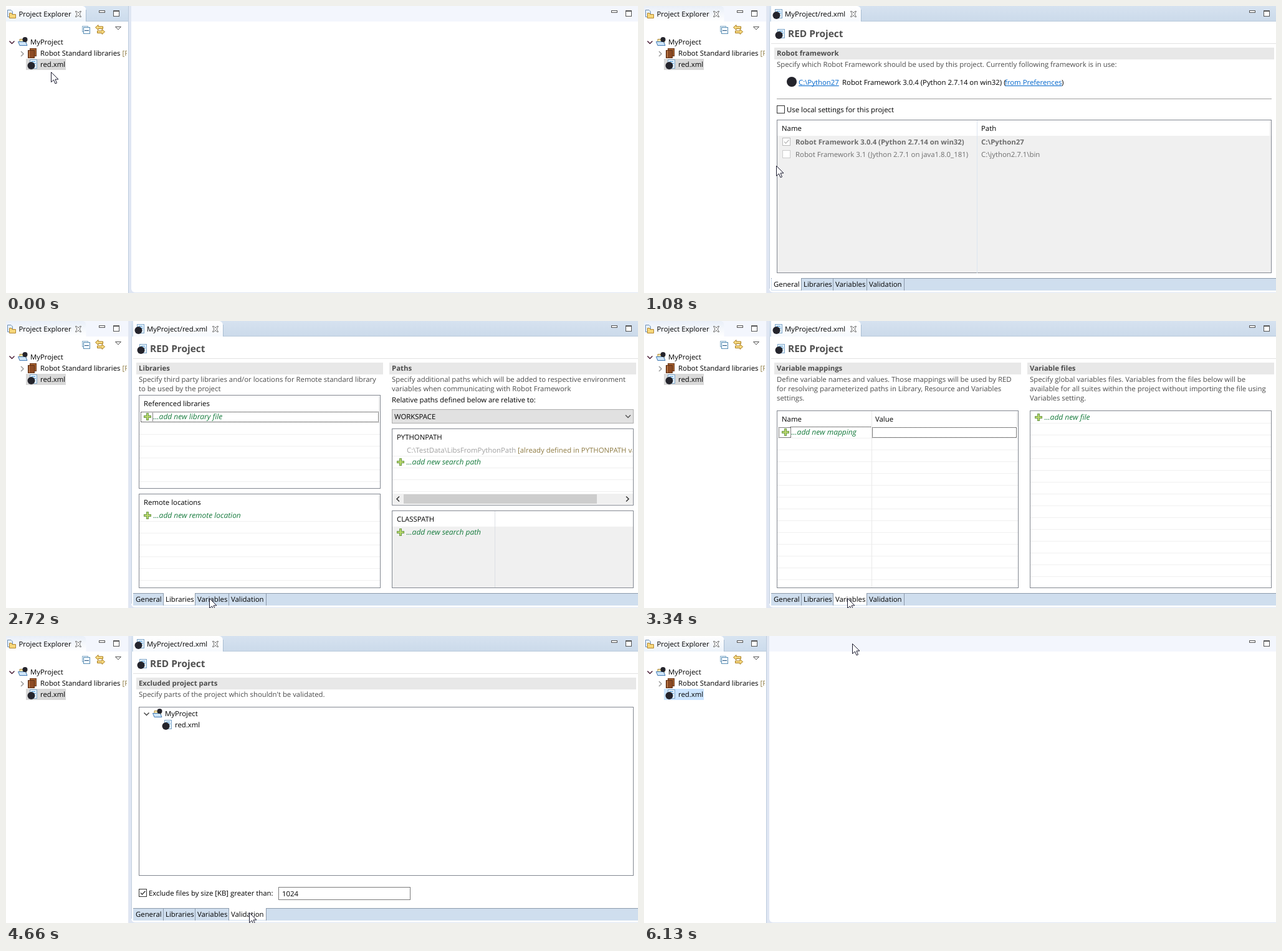
Write an HTML page with a canvas that moves like this. It is 1014x462 px and loops after 6310 ms.

```html
<!DOCTYPE html>
<html lang="en">
<head>
<meta charset="utf-8">
<title>Project editor tour</title>
<style>
html, body { margin: 0; width: 100%; height: 100%; overflow: hidden; background: #fff; }
canvas { display: block; }
</style>
</head>
<body>
<canvas id="stage" width="1014" height="462"></canvas>
<script>
const ctx = document.getElementById('stage').getContext('2d');
const LOOP = 6310, OPEN = 780, PAINTED = 870, CLOSED = 5970;
const SIZE = 11.36;
const BLUE = '#cfdeee', PALE = '#f3f6fd', FRAME = '#828790', GREY = '#f0f0f0';
const MUTED = '#4c4c4c', OLIVE = '#8d7a42', GREEN = '#157a3c', LINK = '#0066cc';

// Cursor moves: start, end, number of steps, destination
const START = [72, 106];
const MOVES = [
  [80, 80, 1, 70, 94],
  [870, 1410, 8, 303, 362],
  [1490, 1870, 6, 268, 449],
  [2410, 2720, 5, 326, 446],
  [3730, 3960, 4, 385, 446],
  [4120, 4200, 2, 390, 445],
  [5210, 5360, 3, 357, 76],
  [5440, 5810, 6, 337, 9],
  [6050, 6130, 2, 334, 12],
];

// Drawing helpers
function rect(x, y, w, h, color) {
  ctx.fillStyle = color;
  ctx.fillRect(x, y, w, h);
}

function box(x, y, right, bottom, stroke, fill) {
  if (fill) rect(x, y, right - x, bottom - y, fill);
  ctx.strokeStyle = stroke;
  ctx.lineWidth = 1;
  ctx.strokeRect(x + .5, y + .5, right - x - 1, bottom - y - 1);
}

function path(points, stroke, fill, width = 1, close = false) {
  ctx.beginPath();
  for (let i = 0; i < points.length; i += 2) ctx.lineTo(points[i], points[i + 1]);
  if (close) ctx.closePath();
  if (fill) { ctx.fillStyle = fill; ctx.fill(); }
  if (stroke) { ctx.strokeStyle = stroke; ctx.lineWidth = width; ctx.stroke(); }
}

function disc(x, y, r, color) {
  ctx.beginPath();
  ctx.arc(x, y, r, 0, 2 * Math.PI);
  ctx.fillStyle = color;
  ctx.fill();
}

function text(str, x, y, color = '#000', style = '', size = SIZE) {
  ctx.font = `${style} ${size}px "Open Sans", "Noto Sans", sans-serif`;
  ctx.fillStyle = color;
  ctx.fillText(str, x, y);
  return x + ctx.measureText(str).width;
}

function link(str, x, y) {
  const end = text(str, x, y, LINK);
  rect(x, y + 1, end - x, 1, LINK);
}

function clipped(right, draw) {
  ctx.save();
  ctx.beginPath();
  ctx.rect(0, 0, right, 462);
  ctx.clip();
  draw();
  ctx.restore();
}

// Focus outline: every second pixel of the border
function dotted(left, top, right, bottom) {
  const dot = (x, y) => { if ((x + y) % 2) rect(x, y, 1, 1, '#000'); };
  for (let x = left; x < right; x++) { dot(x, top); dot(x, bottom - 1); }
  for (let y = top; y < bottom; y++) { dot(left, y); dot(right - 1, y); }
}

function gradient(y0, y1, from, to) {
  const g = ctx.createLinearGradient(0, y0, 0, y1);
  g.addColorStop(0, from);
  g.addColorStop(1, to);
  return g;
}

// Icons and controls
function fileIcon(x, y) {
  box(x + 4, y, x + 16, y + 15, '#7fa6c9', '#e4f1fb');
  rect(x + 7, y + 3, 6, 1, '#4f9bd9');
  rect(x + 9, y + 6, 5, 1, '#4f9bd9');
  disc(x + 6.5, y + 10, 6, '#24242c');
}

function folderIcon(x, y) {
  path([x + 2.5, y + 13.5, x + 2.5, y + 3.5, x + 7, y + 3.5, x + 8, y + 5.5, x + 13, y + 5.5, x + 13, y + 13.5],
    '#b08a3c', '#fbe9ae', 1, true);
  path([x + 2.5, y + 13.5, x, y + 7.5, x + 12, y + 7.5, x + 14.5, y + 13.5], '#3f79b5', '#cfe5f8', 1, true);
  disc(x + 11, y + 4, 4, '#24242c');
}

function plusIcon(x, y) {
  const plus = (r, w, color) => {
    rect(x - r, y - w, 2 * r, 2 * w, color);
    rect(x - w, y - r, 2 * w, 2 * r, color);
  };
  plus(6, 2, '#6d9a4c');
  plus(5, 1, '#b9d86c');
}

function closeIcon(x, y) {
  path([x - 4.5, y - 4.5, x - 2.5, y - 4.5, x, y - 2, x + 2.5, y - 4.5, x + 4.5, y - 4.5, x + 2, y,
    x + 4.5, y + 4.5, x + 2.5, y + 4.5, x, y + 2, x - 2.5, y + 4.5, x - 4.5, y + 4.5, x - 2, y],
    '#666', '#fff', 1, true);
}

function chevron(x, y, color, dx = 4, dy = 2) {
  const points = dx > dy ? [x - dx, y - dy, x, y + dy, x + dx, y - dy] : [x - dx, y - dy, x + dx, y, x - dx, y + dy];
  path(points, color, null, 1.5);
}

function windowButtons(x) {
  box(x, 7, x + 10, 11, '#555', '#fff');
  box(x + 23, 7, x + 33, 17, '#555', '#fff');
  rect(x + 23, 8, 10, 1, '#555');
}

function checkbox(x, y, checked, color = '#333', fill = '#fff') {
  box(x, y, x + 13, y + 13, color, fill);
  if (checked) path([x + 3, y + 6.5, x + 5.5, y + 9, x + 10.5, y + 3.5], color, null, 1.3);
}

function rows(x, right, first, bottom) {
  for (let y = first; y < bottom - 1; y += 19) rect(x + 1, y, right - x - 2, 1, '#f0f0f0');
}

function addItem(label, x, y) {
  plusIcon(x, y - 4);
  text('...add new ' + label, x + 9.5, y, GREEN, 'italic', 12);
}

function section(title, lines, x, right) {
  rect(x - 4, 67, right - x + 4, 19, '#e8e8e8');
  text(title, x, 80, MUTED, 'bold');
  lines.forEach((line, i) => text(line, x, 98 + 15 * i, MUTED));
}

// Side view
function sidebar(focused, selection) {
  rect(0, 0, 197, 462, '#fff');
  rect(0, 0, 196, 25, focused ? gradient(0, 25, '#d8e4f1', '#cbdbec') : PALE);
  ctx.beginPath();
  ctx.moveTo(0, 0);
  ctx.lineTo(123, 0);
  ctx.quadraticCurveTo(128.5, 1, 128.5, 7);
  ctx.lineTo(128.5, 25);
  ctx.lineTo(0, 25);
  ctx.fillStyle = focused ? gradient(0, 25, '#ffffff', '#edf3fa') : gradient(0, 25, '#e9eff8', '#ffffff');
  ctx.fill();
  if (focused) {
    rect(128, 6, 1, 19, '#a9bdd2');
    rect(129, 24, 67, 1, '#b9cadc');
  }
  rect(196, 0, 1, 462, focused ? '#bccbdc' : '#e3e8f2');

  path([2.5, 6.5, 8, 6.5, 10.5, 9, 10.5, 17.5, 2.5, 17.5], '#6f8fb4', '#e6f0fa', 1, true);
  path([5.5, 19.5, 5.5, 11.5, 9, 11.5, 10, 13.5, 15.5, 13.5, 15.5, 19.5], '#b4862f', '#f6d77c', 1, true);
  text('Project Explorer', 20.5, 17);
  closeIcon(116, 13);
  windowButtons(149);

  box(122, 32, 132, 42, '#8fb2cc', '#e8f3fb');
  box(124, 34, 135, 45, '#5b8fb5', '#f4faff');
  rect(126, 39, 7, 1, '#22507c');
  path([143.5, 34.5, 148, 30.5, 148, 33, 155.5, 33, 155.5, 36.5, 148, 36.5, 148, 38.5],
    '#a87b1c', '#f9dc83', 1, true);
  path([158.5, 41.5, 154, 37.5, 154, 40, 146.5, 40, 146.5, 43.5, 154, 43.5, 154, 45.5],
    '#a87b1c', '#f9dc83', 1, true);
  path([175.5, 33.5, 184.5, 33.5, 180, 38], '#555', '#fff', 1, true);

  chevron(9.5, 58.5, '#4b1e36');
  folderIcon(19.5, 50);
  text('MyProject', 39, 62);
  chevron(26, 77, '#9a9a9a', 2, 4);
  box(38, 68, 49, 81, '#6b371a', '#a3602f');
  box(35, 71, 46, 84, '#5b2d14', '#8d4b24');
  rect(37, 72, 1, 11, '#c58a58');
  clipped(194, () => {
    const end = text('Robot Standard libraries', 55, 80);
    text(' [RobotFramework]', end, 80, OLIVE);
  });
  rect(32, 85, 64, 18, selection);
  fileIcon(34, 86);
  text('red.xml', 55, 98);
}

// Editor area
function emptyEditor() {
  rect(197, 0, 817, 462, '#dfe6f3');
  ctx.beginPath();
  ctx.roundRect(201, -10, 830, 471, 6);
  ctx.fillStyle = '#fff';
  ctx.fill();
  rect(201, 0, 813, 25, PALE);
}

function nameTable(top) {
  box(213, top, 1007, 430, FRAME, GREY);
  rect(214, top + 1, 792, 25, '#fff');
  rect(534, top + 1, 1, 429 - top, '#dce5f1');
  rect(1004, top + 1, 1, 25, '#e5e5e5');
  text('Name', 221, top + 18);
  text('Path', 541, top + 18);
}

function editorFrame(active) {
  rect(201, 0, 813, 25, gradient(0, 25, '#d6e2f0', '#cbdaea'));
  ctx.beginPath();
  ctx.moveTo(204, 25);
  ctx.lineTo(204, 0);
  ctx.lineTo(342, 0);
  ctx.quadraticCurveTo(348, 1, 348, 7);
  ctx.lineTo(348, 25);
  ctx.fillStyle = gradient(0, 25, '#ffffff', '#f6f9fd');
  ctx.fill();
  rect(348, 6, 1, 19, '#a9bdd2');
  rect(349, 24, 665, 1, '#b9cadc');
  rect(201, 25, 1, 430, '#c3cfde');
  fileIcon(206, 5);
  text('MyProject/red.xml', 226, 17);
  closeIcon(336, 13);
  fileIcon(210, 37);
  text('RED Project', 231, 50, '#505050', 'bold', 15.4);
  rect(204, 60, 810, 1, '#e2e2e2');

  rect(204, 438, 810, 20, BLUE);
  rect(204, 438, 810, 1, '#8c9aab');
  const edges = [204, 252, 303, 357, 417];
  ['General', 'Libraries', 'Variables', 'Validation'].forEach((name, i) => {
    if (i === active) rect(edges[i] + 1, 438, edges[i + 1] - edges[i] - 1, 19, '#fff');
    rect(edges[i + 1], 439, 1, 19, '#8c9aab');
    text(name, edges[i] + 4, 452);
  });
}

function generalPage() {
  section('Robot framework',
    ['Specify which Robot Framework should be used by this project. Currently following framework is in use:'], 213, 1011);
  disc(237, 122, 8, '#24242c');
  link('C:\\Python27', 248, 127);
  text('Robot Framework 3.0.4 (Python 2.7.14 on win32) (', 318, 127);
  link('from Preferences', 579, 127);
  text(')', 670, 127);
  rect(213, 149, 794, 1, '#a0a0a0');
  checkbox(213, 160, false);
  text('Use local settings for this project', 229, 171);
  nameTable(183);
  checkbox(222, 212, true, '#bbb');
  text('Robot Framework 3.0.4 (Python 2.7.14 on win32)', 243, 223, '#6d6d6d', 'bold');
  text('C:\\Python27', 541, 223, '#6d6d6d', 'bold');
  checkbox(222, 232, false, '#ccc');
  text('Robot Framework 3.1 (Jython 2.7.1 on java1.8.0_181)', 243, 243, '#6d6d6d');
  text('C:\\jython2.7.1\\bin', 541, 243, '#6d6d6d');
}

function librariesPage() {
  section('Libraries', ['Specify third party libraries and/or locations for Remote standard library',
    'to be used by the project'], 213, 605);
  const list = (title, item, top, bottom) => {
    box(213, top, 601, bottom, FRAME, '#fff');
    rows(213, 601, top + 44, bottom);
    rect(598, top + 2, 1, 24, '#e5e5e5');
    text(title, 221, top + 18);
    addItem(item, 227, top + 39);
  };
  list('Referenced libraries', 'library file', 119, 270);
  list('Remote locations', 'remote location', 278, 430);
  dotted(216, 146, 236, 163);
  dotted(235, 146, 598, 163);

  section('Paths', ['Specify additional paths which will be added to respective environment',
    'variables when communicating with Robot Framework'], 619, 1011);
  text('Relative paths defined below are relative to:', 619, 131);
  box(619, 142, 1007, 165, '#adadad', '#e1e1e1');
  text('WORKSPACE', 623, 158);
  chevron(998, 153.5, '#555');

  box(619, 173, 1007, 297, FRAME, '#fff');
  rows(619, 1007, 217, 278);
  text('PYTHONPATH', 627, 191);
  clipped(1005, () => {
    const end = text('C:\\TestData\\LibsFromPythonPath', 643, 212, '#a0a0a0');
    text(' [already defined in PYTHONPATH variable]', end, 212, OLIVE);
  });
  addItem('search path', 633, 231);
  rect(620, 278, 386, 17, GREY);
  rect(638, 279, 310, 15, '#cdcdcd');
  chevron(629, 286.5, '#333', -2, 4);
  chevron(997, 286.5, '#333', 2, 4);

  box(619, 305, 1007, 430, FRAME, GREY);
  rect(620, 306, 386, 25, '#fff');
  rect(784, 306, 1, 123, '#dcdfe4');
  text('CLASSPATH', 627, 323);
  addItem('search path', 633, 344);
}

function variablesPage() {
  section('Variable mappings', ['Define variable names and values. Those mappings will be used by RED',
    'for resolving parameterized paths in Library, Resource and Variables', 'settings.'], 213, 605);
  box(213, 144, 601, 430, FRAME, '#fff');
  rows(213, 601, 188, 430);
  rect(365, 145, 1, 284, '#e8e8e8');
  rect(598, 146, 1, 24, '#e5e5e5');
  text('Name', 221, 162);
  text('Value', 371, 162);
  addItem('mapping', 227, 183);
  dotted(216, 171, 236, 188);
  dotted(235, 170, 365, 171);
  dotted(366, 171, 598, 188);

  section('Variable files', ['Specify global variables files. Variables from the files below will be',
    'available for all suites within the project without importing the file using', 'Variables setting.'], 619, 1011);
  box(619, 144, 1007, 430, FRAME, '#fff');
  rows(619, 1007, 164, 430);
  addItem('file', 633, 159);
}

function validationPage() {
  section('Excluded project parts', ["Specify parts of the project which shouldn't be validated."], 213, 1011);
  box(213, 114, 1007, 386, FRAME, '#fff');
  chevron(225.5, 125.5, '#444');
  folderIcon(235.5, 117);
  text('MyProject', 255, 129);
  fileIcon(250, 135);
  text('red.xml', 271, 147);
  checkbox(213, 407, true);
  text('Exclude files by size [KB] greater than:', 229, 418);
  box(437, 404, 649, 425, '#7a7a7a', '#fff');
  text('1024', 443, 419);
}

const PAGES = [generalPage, librariesPage, variablesPage, validationPage];
const SWITCHES = [2090, 3340, 4600];

function cursorAt(t) {
  let [x, y] = START;
  for (const [start, end, steps, toX, toY] of MOVES) {
    if (t < start) break;
    const step = steps > 1 ? (end - start) / (steps - 1) : 1;
    const p = Math.min(1, (Math.floor((t - start + 6) / step) + 1) / steps);
    const eased = 1 - (1 - p) ** 2;
    x += (toX - x) * eased;
    y += (toY - y) * eased;
  }
  return [Math.round(x), Math.round(y)];
}

function cursor(t) {
  const [x, y] = cursorAt(t);
  if (t >= 460 && t < OPEN) {
    ctx.beginPath();
    ctx.arc(x + .5, y + .5, 9, 0, 2 * Math.PI);
    ctx.lineWidth = 4;
    ctx.strokeStyle = '#3f9fdc';
    ctx.stroke();
    return;
  }
  ctx.save();
  ctx.translate(x + .5, y + .5);
  path([0, 0, 0, 16, 4, 12.5, 6.5, 18.5, 9, 17.5, 6.5, 11.5, 11.5, 11.5], '#1c1c30', '#fff', 1, true);
  ctx.restore();
}

function draw(t) {
  const open = t >= OPEN && t < CLOSED;
  const painted = open && t >= PAINTED;
  const highlighted = t >= 80 && !painted;
  emptyEditor();
  sidebar(!open, highlighted ? '#cce5ff' : '#d9d9d9');
  if (painted) {
    const page = SWITCHES.filter(time => t >= time).length;
    editorFrame(page);
    PAGES[page]();
  } else if (open) {
    rect(965, 0, 49, 24, BLUE);
    nameTable(166);
  }
  windowButtons(971);
  cursor(t);
}

ctx.textRendering = 'geometricPrecision';
function tick() {
  draw(performance.now() % LOOP);
  requestAnimationFrame(tick);
}
tick();
</script>
</body>
</html>
```
